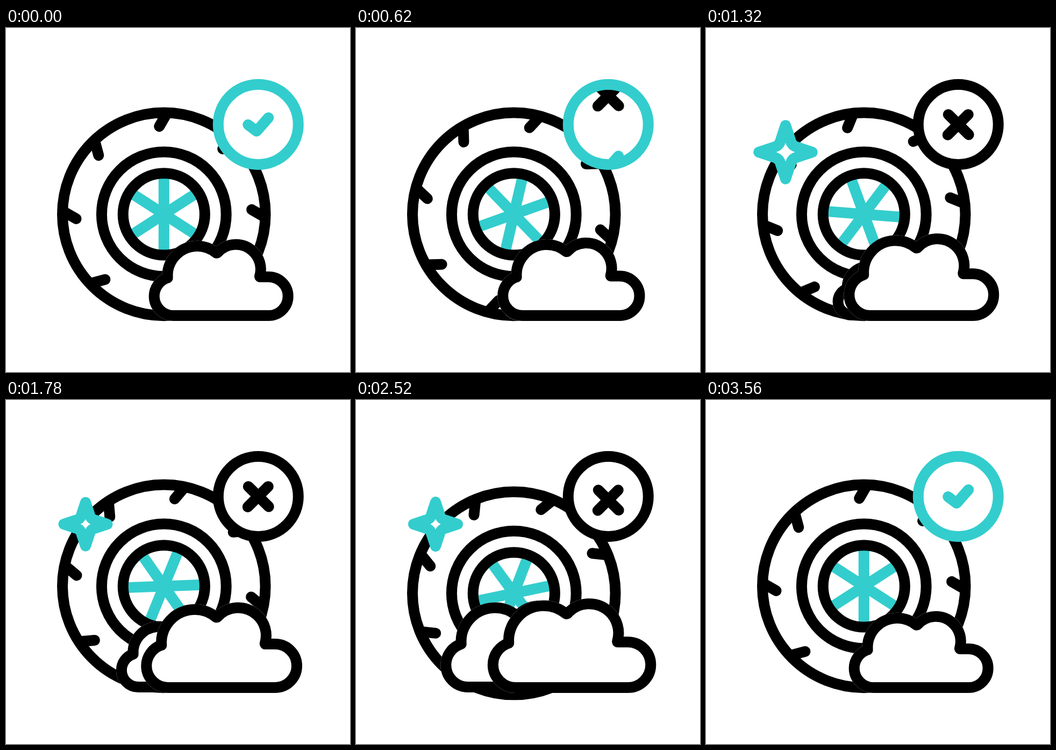
Write an HTML page with a canvas that moves like this. It is 640 by 640 pixels and loops after 3600 ms.

```html
<!DOCTYPE html>
<html lang="en">
<head>
<meta charset="utf-8">
<title>Winter tyre</title>
<style>
html, body { margin: 0; width: 100%; height: 100%; overflow: hidden; background: #fff; }
canvas { display: block; width: 640px; height: 640px; }
</style>
</head>
<body>
<canvas id="stage" width="640" height="640"></canvas>
<script>
const SIZE = 640, LOOP = 3600, END = 3560;
const BLACK = [0, 0, 0], WHITE = [255, 255, 255], TEAL = [51, 205, 205];
const TAU = Math.PI * 2, DEG = Math.PI / 180;
const ctx = document.getElementById('stage').getContext('2d');

const SCALE = [[0, 1], [2960, 1.19], [END, 1]];
const BOB = [[2330, 0], [2645, 20], [2960, 0], [3270, 20], [END, 0]];
const STAR = [[640, 0], [1390, 1], [1775, 0.795], [2165, 1], [2535, 0.805], [2895, 1], [3255, 0.8], [END, 0]];
const SPIN = [[0, 0], [620, 192.6], [1320, 756.3], [1780, 1224], [2520, 2000], [3080, 2483.2], [END, 2700]];
const TO_CROSS = [[150, 0], [1010, 1]];
const TO_CHECK = [[2400, 0], [3265, 1]];
const BADGE_TINT = [[640, 0], [920, 1], [2720, 1], [2980, 0]];
const FADE = [[2950, 1], [END, 0]];

const mix = (a, b, k) => a + (b - a) * k;
const smooth = u => u * u * (3 - 2 * u);
const rgb = c => `rgb(${c.map(Math.round).join(',')})`;

// Eases smoothly from key to key.
function track(keys, t) {
  if (t <= keys[0][0]) return keys[0][1];
  for (let i = 1; i < keys.length; i++) {
    const [t0, a] = keys[i - 1], [t1, b] = keys[i];
    if (t < t1) return mix(a, b, smooth((t - t0) / (t1 - t0)));
  }
  return keys[keys.length - 1][1];
}

// Hermite curve through the keys, at rest at both ends.
function spline(keys, t) {
  const last = keys.length - 1;
  let i = 0;
  while (i < last - 1 && t >= keys[i + 1][0]) i++;
  const slope = n => n === 0 || n === last ? 0
    : (keys[n + 1][1] - keys[n - 1][1]) / (keys[n + 1][0] - keys[n - 1][0]);
  const [t0, a] = keys[i], [t1, b] = keys[i + 1];
  const span = t1 - t0, u = (t - t0) / span, v = 1 - u;
  return mix(a, b, smooth(u)) + span * u * v * (v * slope(i) - u * slope(i + 1));
}

function pen(color) {
  ctx.lineWidth = 20;
  ctx.lineCap = ctx.lineJoin = 'round';
  ctx.strokeStyle = rgb(color);
  ctx.fillStyle = '#fff';
}

function polyline(...points) {
  ctx.beginPath();
  points.forEach(([x, y]) => ctx.lineTo(x, y));
  ctx.stroke();
}

function ring(radius) {
  ctx.beginPath();
  ctx.arc(0, 0, radius, 0, TAU);
  ctx.stroke();
}

function drawWheel(t) {
  ctx.save();
  ctx.translate(293.8, 346.4 + track(BOB, t));
  ctx.save();
  ctx.rotate(spline(SPIN, t) * DEG);
  pen(TEAL);
  for (const angle of [90, 32.8, -32.8]) {
    const x = 72 * Math.cos(angle * DEG), y = 72 * Math.sin(angle * DEG);
    polyline([-x, -y], [x, y]);
  }
  pen(BLACK);
  for (let i = 0; i < 8; i++) {
    const a = (i * 45 - 3) * DEG, lean = a + 33 * DEG;
    const x = 163.5 * Math.cos(a), y = 163.5 * Math.sin(a);
    polyline([x, y], [x + 26 * Math.cos(lean), y + 26 * Math.sin(lean)]);
  }
  ctx.restore();
  pen(BLACK);
  [188.8, 115.9, 76.1].forEach(ring);
  ctx.restore();
}

// The outline scales around the middle of its base; the line weight stays.
function drawCloud(x, base, k) {
  const arc = (cx, cy, r, from, to) =>
    ctx.arc(x + cx * k, base + cy * k, r * k, from * DEG, to * DEG);
  ctx.beginPath();
  arc(-88.5, -36, 36, 90, 252);
  arc(-44.5, -74, 55.2, 176, 310);
  arc(27.5, -86, 46.2, 221.5, 376.5);
  ctx.lineTo(x + 72 * k, base - 72 * k);
  arc(88.5, -36, 36, -90, 90);
  ctx.closePath();
  // A white silhouette lies under the black outline.
  pen(WHITE);
  ctx.fill();
  ctx.stroke();
  pen(BLACK);
  ctx.stroke();
}

function drawClouds(t) {
  const grow = smooth(t / END), k = track(SCALE, t);
  ctx.globalAlpha = track(FADE, t);
  drawCloud(mix(347, 299.5, grow), 534, mix(0.41, 1.33, grow));
  ctx.globalAlpha = 1;
  drawCloud(392.6 + 7.6 * k, 535, k);
}

function drawStar(t) {
  const k = track(STAR, t);
  if (k <= 0) return;
  ctx.save();
  ctx.translate(148, 231);
  pen(TEAL);
  ctx.beginPath();
  for (let i = 0; i < 4; i++) {
    const c = Math.round(Math.cos(i * TAU / 4)), s = Math.round(Math.sin(i * TAU / 4));
    const at = (x, y) => [(x * c - y * s) * k, (x * s + y * c) * k];
    ctx.lineTo(...at(0, -51));
    ctx.lineTo(...at(9, -24));
    ctx.quadraticCurveTo(...at(11.3, -11.3), ...at(24, -9));
  }
  ctx.closePath();
  ctx.fill();
  ctx.stroke();
  ctx.restore();
}

function drawBadge(t) {
  const travel = 125;
  const out = track(TO_CROSS, t), back = track(TO_CHECK, t);
  const checkY = travel * (t < 1700 ? out : back - 1);
  const crossY = travel * (out - 1 + back);
  const tint = track(BADGE_TINT, t);

  ctx.save();
  ctx.translate(469.3, 179.4);
  ctx.save();
  ctx.beginPath();
  ctx.arc(0, 0, 74.5, 0, TAU);
  ctx.fillStyle = '#fff';
  ctx.fill();
  ctx.clip();
  pen(TEAL);
  polyline([-19, checkY + 0.5], [-3, checkY + 12.5], [19, checkY - 12.5]);
  pen(BLACK);
  polyline([-18.5, crossY - 18.5], [19.5, crossY + 19]);
  polyline([18.5, crossY - 18.5], [-19.5, crossY + 19.5]);
  ctx.restore();
  pen(TEAL.map(c => mix(c, 0, tint)));
  ring(74.5);
  ctx.restore();
}

function draw(t) {
  ctx.fillStyle = '#fff';
  ctx.fillRect(0, 0, SIZE, SIZE);
  drawWheel(t);
  drawClouds(t);
  drawStar(t);
  drawBadge(t);
}

function tick() {
  draw(Math.min(performance.now() % LOOP, END));
  requestAnimationFrame(tick);
}
tick();
</script>
</body>
</html>
```
